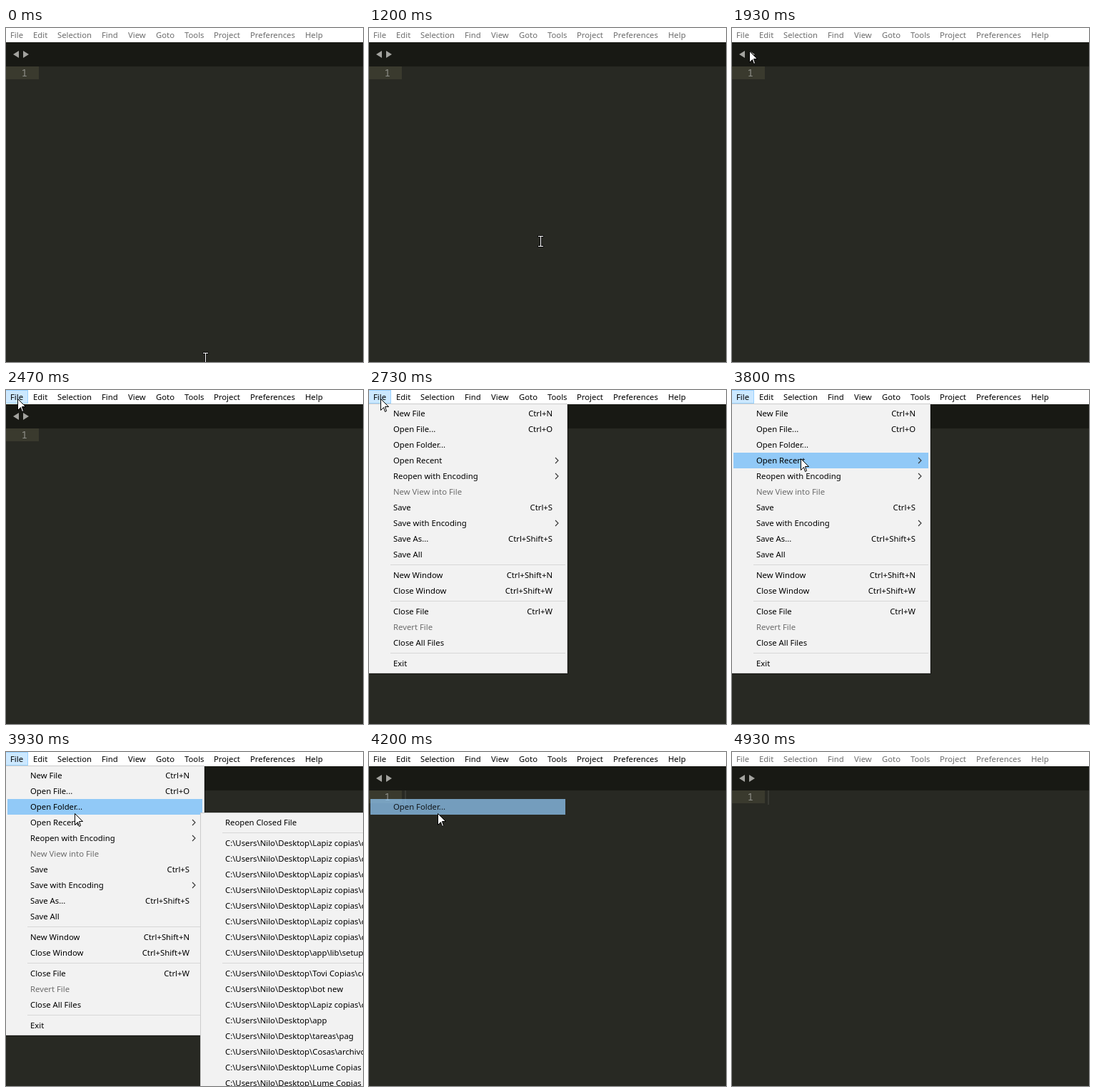
Animation of 500x469 px, one loop 8 s. Source, as an HTML page with a canvas:

```html
<!DOCTYPE html>
<html lang="en">
<head>
<meta charset="utf-8">
<title>Editor menu</title>
<style>
html, body { margin: 0; width: 100%; height: 100%; overflow: hidden; background: #282923; }
canvas { display: block; }
</style>
</head>
<body>
<canvas id="stage" width="500" height="469"></canvas>
<script>
const ctx = document.getElementById('stage').getContext('2d');
const LOOP = 8000;
const TICKS_PER_MS = 15 / 1000;
const UI_FONT = '11.3px "Noto Sans", "Open Sans", sans-serif';
const HIGHLIGHT = '#91c9f7';
const ROW = 22;
const GAP = 7;
const EDGE = 3;

// Moments of the scene, in ticks.
const PRESS = 37, MENU_OPEN = 41, RECENT_OPEN = 58, CHOOSE = 63, FADED = 69, LEAVE = 74;

const MENU_BAR = 'File Edit Selection Find View Goto Tools Project Preferences Help'.split(' ');

// '-' is a separator, '>' marks a submenu, a leading '!' marks a disabled item.
const FILE_MENU = [
  ['New File', 'Ctrl+N'], ['Open File...', 'Ctrl+O'], ['Open Folder...'], ['Open Recent', '>'],
  ['Reopen with Encoding', '>'], ['!New View into File'], ['Save', 'Ctrl+S'],
  ['Save with Encoding', '>'], ['Save As...', 'Ctrl+Shift+S'], ['Save All'], ['-'],
  ['New Window', 'Ctrl+Shift+N'], ['Close Window', 'Ctrl+Shift+W'], ['-'],
  ['Close File', 'Ctrl+W'], ['!Revert File'], ['Close All Files'], ['-'], ['Exit']
];

const inDesktop = name => ['C:\\Users\\Nilo\\Desktop\\' + name];
const COPIES = 'Lapiz copias\\copia';
const RECENT_MENU = [
  ['Reopen Closed File'], ['-'],
  ...Array(7).fill(COPIES).map(inDesktop), inDesktop('app\\lib\\setup.js'), ['-'],
  ...['Tovi Copias\\copia', 'bot new', COPIES, 'app', 'tareas\\pag', 'Cosas\\archivos',
    'Lume Copias dos', 'Lume Copias dos'].map(inDesktop)
];

// Each glide eases the pointer from where it rests to a new place.
const START = { x: 279, y: 463 };
const GLIDES = [
  { from: 4, to: 5, x: 282, y: 467 },
  { from: 17, to: 18, x: 240, y: 299 },
  { from: 22, to: 24, x: 48, y: 90 },
  { from: 26, to: 32, x: 16, y: 12 },
  { from: 44, to: 50, x: 89, y: 82 },
  { from: 50, to: 57, x: 96, y: 96 },
  { from: 58, to: 59, x: 96, y: 86 },
  { from: 66, to: 67, x: 96, y: 96 }
];

const clamp01 = v => Math.min(1, Math.max(0, v));
const easeOut = u => 1 - (1 - u) ** 2;
const mix = (a, b, u) => Math.round(a + (b - a) * u);

function pointerAt(tick) {
  return GLIDES.reduce((p, g) => {
    const u = easeOut(clamp01((tick - g.from) / (g.to - g.from)));
    return { x: mix(p.x, g.x, u), y: mix(p.y, g.y, u) };
  }, START);
}

function rect(x, y, w, h, color) {
  ctx.fillStyle = color;
  ctx.fillRect(x, y, w, h);
}

function polygon(points, fill, stroke) {
  ctx.beginPath();
  points.forEach(([x, y]) => ctx.lineTo(x, y));
  ctx.closePath();
  ctx.fillStyle = fill;
  ctx.fill();
  if (stroke) {
    ctx.strokeStyle = stroke;
    ctx.lineWidth = 1;
    ctx.stroke();
  }
}

function text(str, x, y, color = '#000', align = 'left', font = UI_FONT) {
  ctx.font = font;
  ctx.textAlign = align;
  ctx.fillStyle = color;
  ctx.fillText(str, x, y);
}

function drawTabArrow(tipX, direction) {
  const baseX = tipX - 8 * direction;
  polygon([[tipX, 37], [baseX, 32], [baseX, 42]], '#a3a39f');
}

function drawEditor(caret) {
  rect(0, 0, 500, 469, '#282923');
  rect(0, 20, 500, 34, '#181914');
  drawTabArrow(10, -1);
  drawTabArrow(32, 1);
  rect(0, 54, 46, 18, '#3a3a2e');
  text('1', 21.5, 68, '#90918b', 'left', '14px "Noto Sans Mono", monospace');
  if (caret) rect(50, 54, 2, 20, '#393a34');
}

function drawMenuBar(active, pressed) {
  rect(0, 0, 500, 20, '#fff');
  if (pressed) {
    rect(0, 0, 31, 19, '#99d1ff');
    rect(0, 1, 30, 17, '#cce8ff');
  }
  let x = 6;
  for (const label of MENU_BAR) {
    text(label, x, 14, active ? '#000' : '#6d6d6d');
    x += Math.round(ctx.measureText(label).width) + 2 * GAP;
  }
}

function drawChevron(x, y) {
  ctx.beginPath();
  ctx.moveTo(x, y - 4);
  ctx.lineTo(x + 4, y);
  ctx.lineTo(x, y + 4);
  ctx.strokeStyle = '#333';
  ctx.lineWidth = 1.1;
  ctx.stroke();
}

const itemHeight = ([name]) => name === '-' ? GAP : ROW;

function drawMenu(items, x, y, w, hoverY) {
  const h = items.reduce((sum, item) => sum + itemHeight(item), 2 * EDGE);
  rect(x + 1, y + 1, w, h, 'rgba(0,0,0,.45)');
  rect(x, y, w, h, '#cccccc');
  rect(x + 1, y + 1, w - 2, h - 2, '#f2f2f2');

  let top = y + EDGE;
  for (const item of items) {
    const [name, extra] = item;
    const height = itemHeight(item);
    const middle = top + height / 2;
    if (name === '-') {
      rect(x + 31, top + 3, w - 34, 1, '#d7d7d7');
    } else {
      const disabled = name[0] === '!';
      if (hoverY >= top && hoverY < top + height) {
        rect(x + EDGE, top, w - 2 * EDGE, height, HIGHLIGHT);
      }
      text(disabled ? name.slice(1) : name, x + 35, middle + 4, disabled ? '#6d6d6d' : '#000');
      if (extra === '>') drawChevron(x + 262, middle);
      else if (extra) text(extra, x + 258, middle + 4, '#000', 'right');
    }
    top += height;
  }
}

function drawFadingItem(alpha) {
  ctx.globalAlpha = alpha;
  rect(2, 66, 273, ROW, HIGHLIGHT);
  ctx.globalAlpha = Math.sqrt(alpha);
  text('Open Folder...', 34, 81);
  ctx.globalAlpha = 1;
}

function drawIBeam(x, y) {
  for (const [grow, color] of [[1, '#111'], [0, '#fff']]) {
    const bar = (dx, dy, w, h) =>
      rect(x + dx - grow, y + dy - grow, w + 2 * grow, h + 2 * grow, color);
    bar(-3, -7, 7, 1);
    bar(0, -7, 1, 15);
    bar(-3, 7, 7, 1);
  }
}

function drawArrow(x, y) {
  const shape = [[0, 0], [0, 16], [4, 12], [6, 18], [8, 17], [6, 11], [11, 11]];
  polygon(shape.map(([dx, dy]) => [x + dx + 0.5, y + dy + 0.5]), '#fff', '#000');
}

function draw(tick) {
  const { x, y } = pointerAt(tick);
  const during = (from, to) => tick >= from && tick < to;

  drawEditor(tick >= CHOOSE);
  drawMenuBar(during(PRESS, LEAVE), during(PRESS, CHOOSE));
  if (during(MENU_OPEN, CHOOSE)) drawMenu(FILE_MENU, -1, 19, 279, y);
  if (during(RECENT_OPEN, CHOOSE)) drawMenu(RECENT_MENU, 272, 85, 300, -1);
  if (during(CHOOSE, FADED)) drawFadingItem(0.73 * (FADED - tick) / (FADED - CHOOSE));

  if (tick < LEAVE) (y > 54 && tick < PRESS ? drawIBeam : drawArrow)(x, y);
}

function animate() {
  const time = performance.now() % LOOP;
  draw(Math.floor((time + 4) * TICKS_PER_MS));
  requestAnimationFrame(animate);
}
animate();
</script>
</body>
</html>
```
